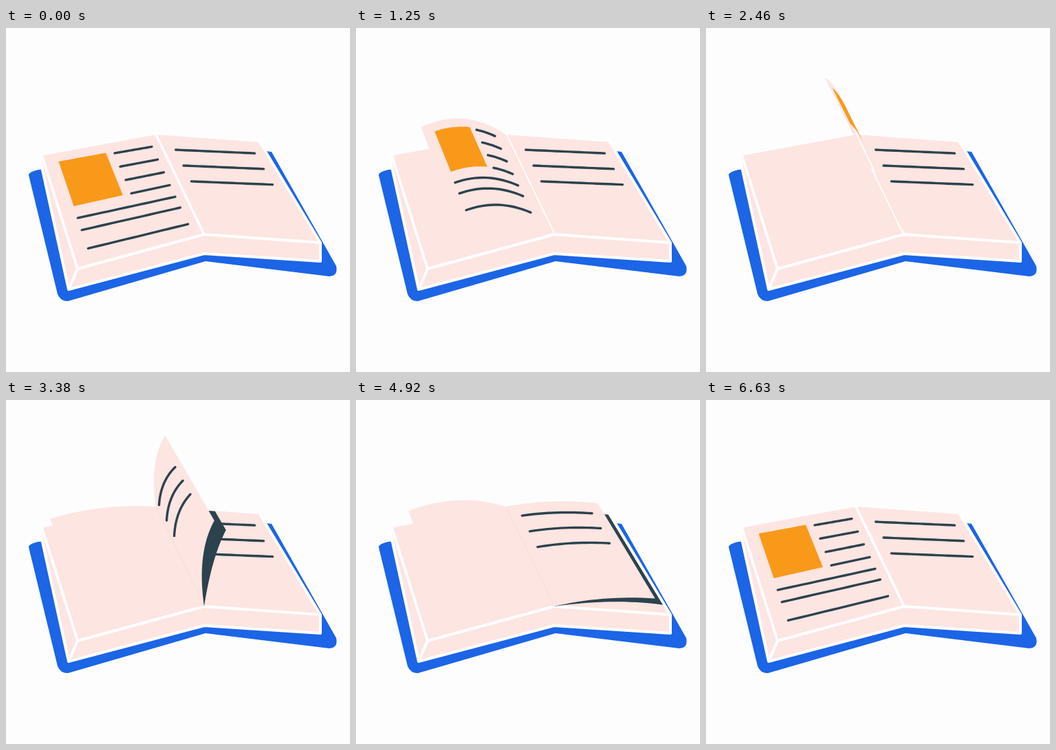
An HTML page with a canvas that plays this animation: 500 by 500 pixels, repeating every 6680 ms.

```html
<!DOCTYPE html>
<html>
<head>
<meta charset="utf-8">
<style>
  html, body { margin: 0; height: 100%; overflow: hidden; background: #fdfdfd; }
  canvas { display: block; }
</style>
</head>
<body>
<canvas id="stage" width="500" height="500"></canvas>
<script>
const ctx = document.getElementById('stage').getContext('2d');
const BACK = '#fdfdfd', PAPER = '#fde5e1', INK = '#2c424d', BLUE = '#1b65e6', ORANGE = '#f9991a';
const STEP = 41.75, CYCLE = 32, REST = 31;

// Start and length of each turn, in steps; the last leaf carries the picture
const LEAVES = [[1.6, 8], [6.2, 12.2], [13.8, 10], [21.5, 11.5]];

const mix = (a, b, k) => a + (b - a) * k;
const clamp = x => Math.max(0, Math.min(1, x));

// c runs from 1 (flat on the right) to -1 (flat on the left)
function leafPose(c) {
  const up = 1 - Math.abs(c), bulge = up * (1 - up);
  const ex = 160 * c - 6, ey = 20.5 - 8.5 * c - 140 * up;
  return {
    c, up, ex, ey,
    cx: ex / 2 - 180 * Math.max(c, 0) * up * up,
    cy: ey / 2 - (140 - 60 * c) * bulge,
    drop: 9 - 9 * c - 20 * Math.sqrt(up)
  };
}
const RIGHT = leafPose(1), LEFT = leafPose(-1);

// s runs from spine to outer edge, v from far to near along the spine
function point({ ex, ey, cx, cy, drop }, s, v) {
  const bend = 2 * s * (1 - s), end = s * s, size = 1 + .1 * v;
  return [
    218 + 70 * v + size * (bend * cx + end * ex),
    155 + 145 * v + size * (bend * cy + end * ey) + drop * v * (bend / 2 + end)
  ];
}

function trace(pose, s0, v0, s1, v1) {
  for (let i = 0; i <= 16; i++)
    ctx.lineTo(...point(pose, mix(s0, s1, i / 16), mix(v0, v1, i / 16)));
}

function outline(pose, s0 = 0, v0 = 0, s1 = 1, v1 = 1) {
  ctx.beginPath();
  trace(pose, s0, v0, s1, v0);
  trace(pose, s1, v1, s0, v1);
  ctx.closePath();
}

function patch(color, ...area) {
  outline(...area);
  ctx.fillStyle = color;
  ctx.fill();
}

function line(...ends) {
  ctx.beginPath();
  trace(...ends);
  ctx.strokeStyle = INK;
  ctx.lineWidth = 3.4;
  ctx.stroke();
}

function rightText(pose) {
  const { up } = pose, lift = .05 * clamp(5 * up), skew = .22 * up * up;
  for (let i = 0; i < 3; i++)
    line(pose, .12, .142 + .158 * i - lift, .87, .114 + .156 * i + skew);
}

function leftText(pose) {
  patch(ORANGE, pose, .47, .083, .88, .48);
  if (pose.up > .6) return;
  const inner = .08 + .4 * pose.up;
  for (let i = 0; i < 4; i++) line(pose, inner, .104 + .127 * i, .4, .1 + .127 * i);
  for (const v of [.6, .707, .871]) line(pose, inner, v, .88, v - .015);
}

function shadow(pose) {
  const k = Math.min(clamp(5 * pose.up), clamp(3 * (pose.c + .2)));
  if (!k) return;
  ctx.save();
  outline(RIGHT);
  ctx.clip();
  patch(INK, { ...pose, ex: pose.ex + 16 * k, ey: pose.ey + 13 * k, cx: pose.cx + 21 * k, cy: pose.cy + 6 * k });
  ctx.restore();
}

const cover = new Path2D('M33 214Q33 209 47 206L200 200 378 179 386 180 480 346Q483 360 470 361L290 339 90 397Q79 397 75 387Z');
const block = new Path2D('M50 186L91 380 288 328 457 339 457 312 369 166 218 155Z');
const edges = new Path2D('M369 166L457 312V339L288 328 91 380 49 188M52 185L104 350 288 300 457 312M104 350L91 380M218 155L288 300');

function draw(f) {
  ctx.fillStyle = BACK;
  ctx.fillRect(0, 0, 500, 500);
  ctx.lineCap = ctx.lineJoin = 'round';
  ctx.fillStyle = BLUE;
  ctx.fill(cover);
  ctx.fillStyle = PAPER;
  ctx.fill(block);
  ctx.strokeStyle = '#fff';
  ctx.lineWidth = 4;
  ctx.stroke(edges);

  const turns = LEAVES.map(([start, length]) => f < REST ? clamp((f - start) / length) : 1);
  if (turns[0] < 1 || turns[3] === 1) leftText(LEFT);
  rightText(RIGHT);

  // Quick lift, slow landing
  const poses = turns.map(q => leafPose(2 * (1 - q) ** 1.5 - 1));
  poses.forEach(shadow);
  poses.forEach((pose, i) => {
    if (!pose.up) return;
    patch(PAPER, pose);
    if (pose.c > -.2) rightText(pose);
    else if (i === 3) leftText(pose);
  });
}

const start = performance.now();
function tick() {
  const t = performance.now() - start;
  draw(Math.floor((t % (STEP * CYCLE * 5) + 15) / STEP) % CYCLE);
  requestAnimationFrame(tick);
}
tick();
</script>
</body>
</html>
```
